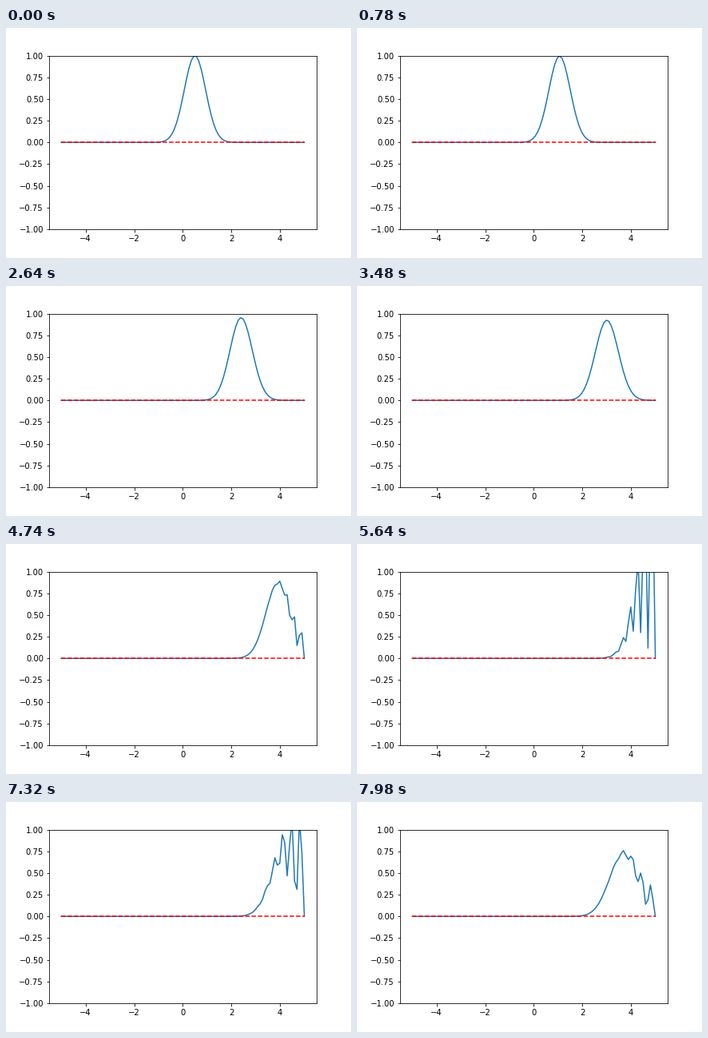
A matplotlib script that plays this animation: 432x288 px, repeating every 8 s.

```python
import numpy as np
import matplotlib.pyplot as plt
from matplotlib.animation import FuncAnimation

TICK, HOLD, LOOP = 20, 60, 8000      # ms
DT = 0.0052                          # model time per step
X0, K0, WIDTH = 0.5, 10.0, 0.62      # initial packet

# Free particle between hard walls, expanded in the grid's sine modes
x = np.linspace(-5, 5, 100)
dx = x[1] - x[0]
n = len(x) - 1
modes = np.arange(1, n)
basis = np.sqrt(2 / n) * np.sin(np.pi * np.outer(np.arange(n + 1), modes) / n)
energy = (1 - np.cos(np.pi * modes / n)) / dx**2

start = np.exp(-(x - X0)**2 / (2 * WIDTH**2) + 1j * K0 * x)
weights = basis.T @ start


def density(step):
    psi = basis @ (weights * np.exp(-1j * energy * step * DT))
    return np.abs(psi)**2


fig, ax = plt.subplots(figsize=(6, 4), dpi=72)
fig.subplots_adjust(left=0.125, right=0.9, bottom=0.125, top=0.88)
wave, = ax.plot(x, density(0))
ax.plot(x, np.zeros_like(x), "r--")
ax.set_ylim(-1, 1)


def update(i):
    wave.set_ydata(density(i * TICK // HOLD))
    return wave,


anim = FuncAnimation(fig, update, frames=LOOP // TICK, interval=TICK,
                     repeat=True, repeat_delay=0)
plt.show()
```
